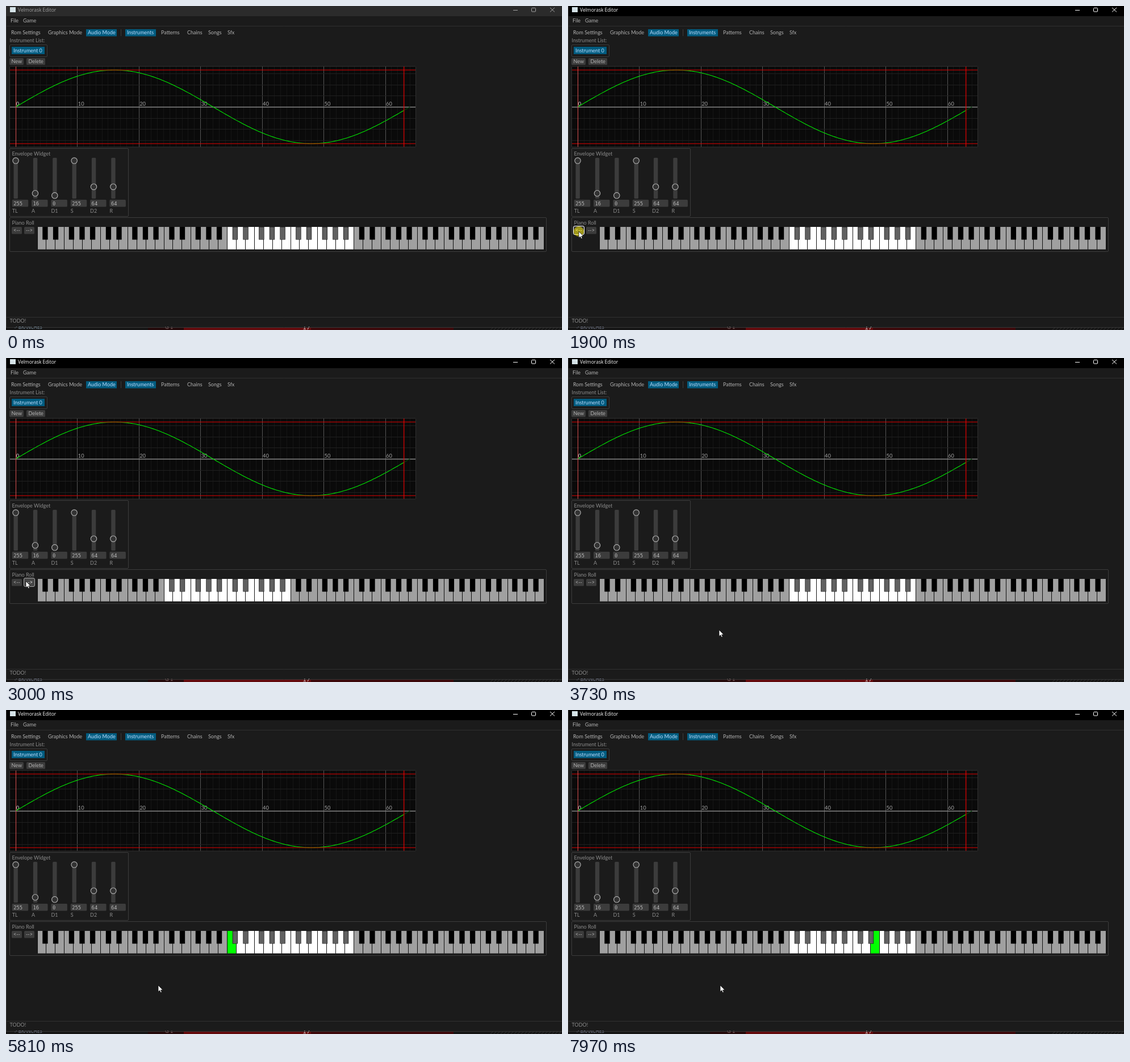
An HTML page with a canvas that plays this animation: 979x572 px, repeating every 8 s.

```html
<!DOCTYPE html>
<html lang="en">
<head>
<meta charset="utf-8">
<title>Instrument editor</title>
<style>
  html, body { margin: 0; width: 100%; height: 100%; overflow: hidden; background: #1b1b1b; }
  canvas { display: block; width: 979px; height: 572px; }
</style>
</head>
<body>
<canvas id="stage" width="979" height="572"></canvas>
<script>
const ctx = document.getElementById('stage').getContext('2d');
const W = 979, H = 572, LOOP = 8000;
const UI = '9px Lato, "Noto Sans", sans-serif';
const MONO = '8.8px "DejaVu Sans Mono", monospace';
const TITLE = '8.5px "Open Sans", "Noto Sans", sans-serif';

// Cursor tip: time, x, y
const PATH = [
  [230, 876, 564], [1030, 136, 430], [1130, 137, 424], [1270, 137, 424],
  [1340, 109, 414], [1670, 19, 398], [2500, 19, 398], [2750, 35, 394],
  [3030, 35, 394], [3090, 38, 394], [3500, 38, 394], [3730, 272, 482],
  [3890, 273, 482], [4050, 273, 482], [4150, 264, 473], [4290, 268, 485],
  [4520, 268, 486]
];
const CLICKS = [[1900, 2000], [2380, 2480], [2890, 2970], [3420, 3500]];
// Time and first octave of the playable range
const RANGE = [[0, 3], [2000, 2], [2480, 1], [2970, 2], [3500, 3], [4720, 2], [5030, 1], [5320, 2], [5550, 3]];
// On, off, white key index
const NOTES = [[5810, 5920, 21], [6040, 6180, 22], [6300, 6420, 23], [6590, 6710, 24],
  [7510, 7650, 28], [7755, 7860, 29], [7970, 8000, 30]];
const BUTTONS = [[10, 390, 18, 13, '<--'], [32, 390, 18, 13, '-->']];
const PIANO = { x: 55, y: 390, w: 892, h: 40, keys: 56 };
const KEY_W = PIANO.w / PIANO.keys, OCT_W = KEY_W * 7;

function fill(x, y, w, h, color) {
  ctx.fillStyle = color;
  ctx.fillRect(x, y, w, h);
}
function box(x, y, w, h, r, bg, border) {
  ctx.beginPath();
  ctx.roundRect(x, y, w, h, r);
  if (bg) { ctx.fillStyle = bg; ctx.fill(); }
  if (border) { ctx.strokeStyle = border; ctx.lineWidth = 1; ctx.stroke(); }
}
function line(x1, y1, x2, y2, color, width = 1) {
  ctx.strokeStyle = color;
  ctx.lineWidth = width;
  ctx.beginPath();
  ctx.moveTo(x1, y1);
  ctx.lineTo(x2, y2);
  ctx.stroke();
}
function text(s, x, y, color = '#b2b2b2', font = UI) {
  ctx.font = font;
  ctx.fillStyle = color;
  ctx.fillText(s, x, y);
}
const frame = (x, y, w, h) => box(x + .5, y + .5, w, h, 1.5, null, '#3c3c3c');
const inside = (p, [x, y, w, h]) => p && p.x >= x && p.x <= x + w && p.y >= y && p.y <= y + h;

function cursorAt(time) {
  const t = 230 + Math.floor((time - 230) / 37) * 37;
  if (t < PATH[0][0]) return null;
  for (let i = 1; i < PATH.length; i++) {
    const [t0, x0, y0] = PATH[i - 1], [t1, x1, y1] = PATH[i];
    if (t > t1) continue;
    let p = (t - t0) / (t1 - t0);
    if (i === 5) p = 1 - (1 - p) ** 2;
    else if (t1 - t0 > 200) p = p * p * (3 - 2 * p);
    return { x: Math.round(x0 + (x1 - x0) * p), y: Math.round(y0 + (y1 - y0) * p) };
  }
  const [, x, y] = PATH[PATH.length - 1];
  return { x, y };
}

function drawTitle(active) {
  const color = active ? '#ffffff' : '#a2a2a2';
  fill(0, 0, W, 18, active ? '#000000' : '#2b2b2b');
  fill(7, 2, 10, 9, '#d5e3e8');
  text('Velmorask Editor', 21, 10, color, TITLE);
  line(893, 7.5, 901, 7.5, color);
  box(925.5, 3.5, 7, 6.5, 1, null, color);
  line(958, 3, 966, 10.5, color);
  line(966, 3, 958, 10.5, color);
}

function drawMenus() {
  text('File', 8, 29);
  text('Game', 30, 29);
  line(0, 35.5, W, 35.5, '#303030');
  fill(141, 41, 54, 12.5, '#005c80');
  fill(210, 41, 54, 12.5, '#005c80');
  line(202.5, 41, 202.5, 53, '#3c3c3c');
  const tabs = [['Rom Settings', 9], ['Graphics Mode', 74], ['Audio Mode', 144, 1], ['Instruments', 213, 1],
    ['Patterns', 273], ['Chains', 319], ['Songs', 356], ['Sfx', 390]];
  for (const [s, x, on] of tabs) text(s, x, 50, on ? '#c0deff' : '#b2b2b2');

  text('Instrument List:', 6.5, 64, '#8c8c8c');
  frame(6, 68, 66, 21);
  fill(10, 72, 58, 13, '#005c80');
  text('Instrument 0', 13, 82, '#c0deff');
  box(6, 92, 25, 12, 1.5, '#3c3c3c');
  text('New', 9.5, 101);
  box(36, 92, 33, 12, 1.5, '#3c3c3c');
  text('Delete', 39.5, 101);
}

function drawPlot() {
  const x0 = 17.3, unit = 10.845, mid = 178, amp = 65;
  const px = v => x0 + v * unit;
  const wave = (from, to, color) => {
    ctx.strokeStyle = color;
    ctx.lineWidth = 1.1;
    ctx.beginPath();
    for (let v = from; v <= to; v += .25) ctx.lineTo(px(v), mid - amp * Math.sin(v * Math.PI / 32));
    ctx.stroke();
  };
  fill(7, 107, 715, 142, '#0a0a0a');
  ctx.save();
  ctx.beginPath();
  ctx.rect(7, 107, 715, 142);
  ctx.clip();
  for (let v = 0; v < 65; v++) {
    const x = Math.floor(px(v)) + .5;
    line(x, 107, x, 249, v % 10 ? '#151515' : '#555555');
  }
  for (let k = -3; k <= 3; k++) {
    const y = Math.round(mid + k * 19.7) + .5;
    line(7, y, 722, y, k ? '#202020' : '#868686', k ? 1 : 1.3);
  }
  for (let v = 0; v <= 60; v += 10) text(v, px(v) + (v ? 1 : .5), 176, v ? '#a2a2a2' : '#d0d0d0', '9.3px Lato, sans-serif');
  wave(63, 64, '#06470a');
  wave(0, 63, '#00e800');
  for (const y of [113, 243]) line(7, y, 722, y, '#e60000', 1.2);
  line(17.5, 107, 17.5, 249, '#d85050');
  line(700.7, 107, 700.7, 249, '#e60000', 1.2);
  ctx.restore();
  box(6.5, 106.5, 715, 142.5, 1, null, '#303030');
}

function drawEnvelope() {
  frame(6, 251, 209, 120);
  text('Envelope Widget', 10.5, 264, '#8c8c8c');
  const sliders = [['TL', 255], ['A', 16], ['D1', 0], ['S', 255], ['D2', 64], ['R', 64]];
  sliders.forEach(([name, value], i) => {
    const x = 10.7 + i * 34.35;
    box(x + 2.8, 268, 7.4, 72, 1.5, '#3c3c3c');
    ctx.beginPath();
    ctx.arc(x + 6.4, 334.6 - value * 61.5 / 255, 5.2, 0, Math.PI * 2);
    ctx.fillStyle = '#333333';
    ctx.fill();
    ctx.strokeStyle = '#b4b4b4';
    ctx.lineWidth = 1.1;
    ctx.stroke();
    box(x, 342, 28.5, 12.5, 1.5, '#3c3c3c');
    text(value, x + 2.5, 351.5, '#b8b8b8', MONO);
    text(name, x, 365, '#8c8c8c');
  });
}

function drawPiano(t, tip, pressed) {
  const { x, y, w, h, keys } = PIANO;
  const first = RANGE.filter(r => r[0] <= t).pop()[1];
  const note = NOTES.find(n => t >= n[0] && t < n[1]);
  const active = octave => octave === first || octave === first + 1;

  frame(6, 373, 945, 60);
  text('Piano Roll', 10.5, 385.5, '#8c8c8c');
  for (const b of BUTTONS) {
    const over = inside(tip, b), [bx, by, bw, bh, label] = b;
    if (over) box(bx - .5, by - 1.5, bw + 1, bh + 2, 2.5, pressed ? '#373737' : '#464646', pressed ? '#ffffff' : '#a8a8a8');
    else box(bx, by, bw, bh - .5, 1.5, '#3c3c3c');
    text(label, bx + 3, 399.3, over ? '#f0f0f0' : '#b2b2b2');
  }

  for (let i = 0; i < keys; i++) {
    const color = note && note[2] === i ? '#00ff00' : active(Math.floor(i / 7)) ? '#ffffff' : '#a0a0a0';
    fill(x + i * KEY_W, y, KEY_W + .1, h, color);
  }
  for (let i = 0; i <= keys; i++) {
    const kx = Math.floor(x + i * KEY_W) + .5;
    line(kx, y, kx, y + h, '#000000', .9);
  }
  line(x, y + h, x + w, y + h, '#202020', .7);
  const semi = OCT_W / 12;
  for (let o = 0; o < 8; o++)
    for (const s of [1, 3, 6, 8, 10]) {
      const kx = x + o * OCT_W + s * semi;
      fill(kx, y, semi, 22.5, '#000000');
      if (active(o)) fill(kx + .6, y + .4, semi - 1.2, 21.6, '#606060');
    }

  // The highlighted key trails the pointer by one step
  const last = cursorAt(t - 37);
  if (inside(last, [x, y, w, h + 1]) && inside(tip, [x, y, w, h + 1])) {
    const i = Math.floor((last.x - x) / KEY_W);
    box(x + i * KEY_W - .5, 411.5, KEY_W, 19.5, 1, '#a0a0a0', '#8e8e8e');
  }
}

function drawBehind(active) {
  fill(0, 567, W, 5, '#151515');
  fill(250, 568, 63, 4, '#240a0b');
  fill(313, 568, 224, 4, '#640b0d');
  fill(537, 568, 251, 4, '#3c090b');
  ctx.save();
  ctx.beginPath();
  ctx.rect(0, 566, W, 6);
  ctx.clip();
  text('> BRANCHES', 15, 570, active ? '#8890a8' : '#8fa9bd', '8.2px "Open Sans", sans-serif');
  text('G 1', 280, 570, '#8a7070');
  text('17', 522, 571, '#d0c4c4', '12px Lato, sans-serif');
  for (let x = 852; x < W; x += 6) line(x, 573, x + 6, 567, '#303030');
  ctx.restore();
  line(0, 567.5, W, 567.5, '#363636');
}

function drawCursor({ x, y }, pressed) {
  if (pressed) {
    ctx.beginPath();
    ctx.arc(x, y, 9, 0, Math.PI * 2);
    ctx.fillStyle = 'rgba(255, 240, 0, .52)';
    ctx.fill();
  }
  ctx.beginPath();
  for (const [dx, dy] of [[0, 0], [0, 11.4], [2.6, 9], [4.4, 13], [6.3, 12.2], [4.6, 8.4], [8, 8.2]]) ctx.lineTo(x + dx, y + dy);
  ctx.closePath();
  ctx.fillStyle = '#ffffff';
  ctx.fill();
  ctx.strokeStyle = '#000000';
  ctx.lineWidth = .7;
  ctx.stroke();
}

function draw(t) {
  const tip = cursorAt(t), active = t >= 1900;
  const pressed = CLICKS.some(([a, b]) => t >= a && t < b);
  fill(0, 0, W, H, '#1b1b1b');
  drawTitle(active);
  drawMenus();
  drawPlot();
  drawEnvelope();
  drawPiano(t, tip, pressed);
  line(0, 549.5, W, 549.5, '#303030');
  text('TODO!', 6.5, 559, '#8c8c8c');
  drawBehind(active);
  line(.5, 0, .5, 568, '#383838');
  if (tip) drawCursor(tip, pressed);
}

const start = performance.now();
function tick() {
  draw((performance.now() - start) % LOOP);
  requestAnimationFrame(tick);
}
tick();
</script>
</body>
</html>
```
